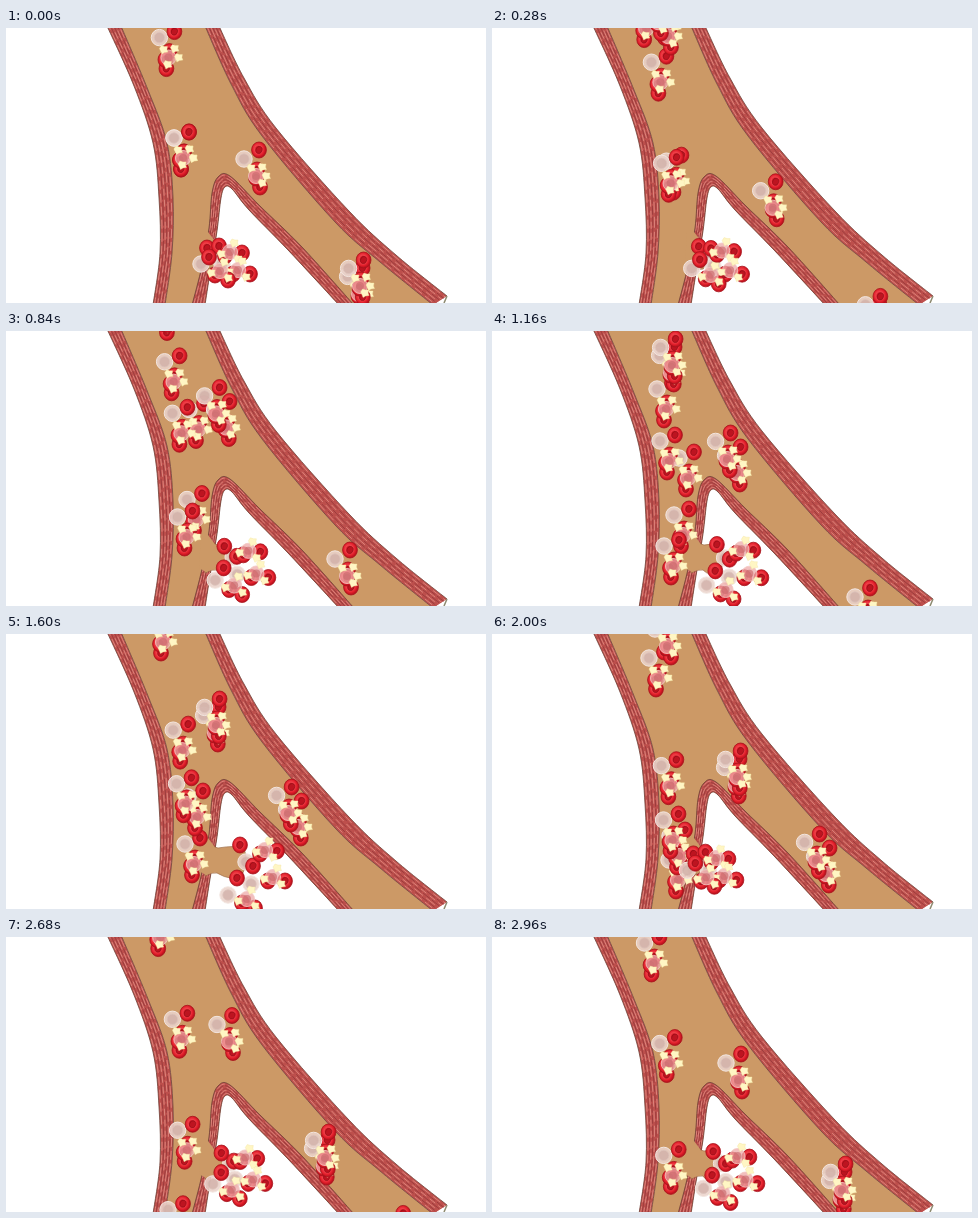
Recreate the animation shown at these times as an HTML page. Size 480 by 275 pixels, loop 3 s.

```html
<!DOCTYPE html>
<html lang="en">
<head>
<meta charset="utf-8">
<title>Blood vessel</title>
<style>
  html, body { margin: 0; width: 100%; height: 100%; overflow: hidden; background: #fff; }
  svg { display: block; width: 100%; height: 100%; }
</style>
</head>
<body>
<svg id="stage" viewBox="0 0 480 275">
  <defs>
    <radialGradient id="redFill" cx=".45" cy=".45">
      <stop offset="0" stop-color="#b80f1c"/>
      <stop offset=".3" stop-color="#c9141f"/>
      <stop offset=".5" stop-color="#f0414a"/>
      <stop offset=".8" stop-color="#e21f2b"/>
      <stop offset="1" stop-color="#c01420"/>
    </radialGradient>
    <g id="red">
      <ellipse rx="7.4" ry="8" fill="url(#redFill)" stroke="#a8121b" stroke-width=".8"/>
      <ellipse rx="3" ry="3.6" fill="#bd1420" stroke="#8f0d16" stroke-width=".6" transform="rotate(20)"/>
    </g>
    <g id="white">
      <circle r="8.2" fill="#ead3cb" fill-opacity=".88" stroke="#f3e6e0" stroke-width="1"/>
      <circle r="5.2" fill="#cfaea6" fill-opacity=".75" stroke="#dcc3bb" stroke-width=".8"/>
    </g>
    <g id="pale">
      <circle r="7.6" fill="#eeaaa8" fill-opacity=".75" stroke="#f3c8c2" stroke-width=".8"/>
      <circle r="4" fill="#c9686c" fill-opacity=".65"/>
    </g>
    <path id="platelet" fill="#fff6c4" stroke="#f3e3a0" stroke-width=".4"
      d="M-4-1L-2-4L1-3L4-3L3.5 0L4.5 2.5L1 3L-1.5 4.5L-2.5 2Z"/>
  </defs>
</svg>
<script>
const LOOP = 3000, STEP = 40;
const stage = document.getElementById('stage');

function add(parent, tag, attrs = {}) {
  const node = document.createElementNS('http://www.w3.org/2000/svg', tag);
  for (const key in attrs) node.setAttribute(key, attrs[key]);
  parent.appendChild(node);
  return node;
}
const put = (parent, id, x, y) =>
  add(parent, 'use', { href: '#' + id, transform: `translate(${x} ${y})` });

// Catmull-Rom curve through the points, as the tail of a path
function curve(pts) {
  let d = '';
  for (let i = 0; i < pts.length - 1; i++) {
    const a = pts[Math.max(i - 1, 0)], b = pts[i], c = pts[i + 1], e = pts[Math.min(i + 2, pts.length - 1)];
    d += `C${b[0] + (c[0] - a[0]) / 6} ${b[1] + (c[1] - a[1]) / 6} ` +
         `${c[0] - (e[0] - b[0]) / 6} ${c[1] - (e[1] - b[1]) / 6} ${c[0]} ${c[1]}`;
  }
  return d;
}
const line = pts => `M${pts[0]}` + curve(pts);
const band = (a, b) => {
  const back = [...b].reverse();
  return line(a) + `L${back[0]}` + curve(back) + 'Z';
};
const mix = (a, b, f) => a.map((p, i) => [p[0] + (b[i][0] - p[0]) * f, p[1] + (b[i][1] - p[1]) * f]);

// Each wall: outer edge, inner edge
const walls = [
  [[[101, -2], [128, 58], [147, 115], [153, 170], [154, 225], [147, 277]],
   [[115, -2], [142, 62], [161, 115], [167, 170], [166, 225], [159, 277]]],
  [[[213, -2], [238, 50], [270, 100], [343, 183], [390, 227], [441, 268]],
   [[199, -2], [225, 56], [256, 108], [329, 194], [374, 234], [427, 277]]],
  [[[199, 277], [204, 245], [211, 203], [215, 170], [219, 159], [226, 161], [243, 182], [282, 222], [333, 277]],
   [[186, 277], [196, 238], [203, 200], [206, 165], [212, 149], [224, 148], [254, 178], [296, 219], [348, 277]]]
];

function drawVessel() {
  const [left, right, fork] = walls;
  add(stage, 'path', { d: band(left[1], right[1]), fill: '#cc9966' });
  add(stage, 'path', { d: line(fork[0]) + 'Z', fill: '#fff' });
  walls.forEach(([outer, inner], w) => {
    add(stage, 'path', { d: band(outer, inner), fill: '#bd4f4c' });
    for (let k = 1; k < 8; k++) {
      add(stage, 'path', {
        d: line(mix(outer, inner, k / 8)), fill: 'none',
        stroke: k % 2 ? '#e08b80' : '#973a3b', 'stroke-width': .9,
        'stroke-dasharray': `${7 + k % 3 * 2} ${2 + k % 2 * 2}`, 'stroke-dashoffset': k * 5 + w * 3
      });
    }
    for (const edge of [outer, inner])
      add(stage, 'path', { d: line(edge), fill: 'none', stroke: '#6d4137', 'stroke-width': .8 });
  });
  add(stage, 'path', { d: 'M441 268L438 275', stroke: '#8d8a70', 'stroke-width': 1.5 });
}

function cluster(parent, lean) {
  const g = add(parent, 'g');
  put(g, 'white', -9 - 3 * lean, -20 + 3 * lean);
  put(g, 'red', 6 - 3 * lean, -26);
  put(g, 'red', -2 + 6 * lean, 11);
  put(g, 'red', 1, -6);
  put(g, 'red', -3 + 3 * lean, 2);
  put(g, 'pale', 0, 0);
  put(g, 'platelet', -5, -8);
  put(g, 'platelet', 10, 0);
  put(g, 'platelet', 6, -9);
  put(g, 'platelet', -1 + 7 * lean, 7);
  return g;
}

// Keys are [seconds, x, y]; outside them the part is hidden
function at(keys, t) {
  for (let i = 1; i < keys.length; i++) {
    const [t0, x0, y0] = keys[i - 1], [t1, x1, y1] = keys[i];
    if (t >= t0 && t < t1) {
      const f = (t - t0) / (t1 - t0);
      return [x0 + (x1 - x0) * f, y0 + (y1 - y0) * f];
    }
  }
  return null;
}
const shift = (keys, dt, end = 9) => keys.map(([t, x, y]) => [t + dt, x, y]).filter(k => k[0] <= end);

const leftPath = [[-1.2, 143, -29], [-.8, 157, 8], [-.4, 166, 44], [0, 174, 78], [.6, 177, 130],
                  [1.12, 180, 177], [1.76, 181, 235], [2.08, 179, 262], [2.44, 174, 294], [2.7, 168, 318]];
const flows = [
  { keys: [[3, 177, 130], [3.52, 189, 173], [4.16, 191, 204], [4.6, 188, 230], [5, 186, 246], [5.12, 184, 252]] },
  { keys: [[.1, 165, -40], [.52, 188, 50], [1.16, 196, 147], [1.6, 191, 183], [2, 187, 222], [2.4, 178, 264], [2.8, 168, 305]] },
  { keys: shift(leftPath, 1.16, 3.3) },
  { keys: shift(leftPath, 2.4, 4.5) },
  { keys: shift(leftPath, 3.56) },
  { lean: .8, twin: [-1, 8],
    keys: [[.7, 150, -40], [1.16, 180, 34], [1.6, 210, 91], [2, 245, 143], [2.4, 288, 189], [2.96, 350, 253], [3, 354, 258], [3.4, 398, 310]] },
  { lean: 1,
    keys: [[1.6, 150, -42], [2, 175, 12], [2.4, 200, 66], [2.96, 246, 143], [3, 250, 148], [3.52, 307, 207], [4.16, 375, 283], [4.4, 400, 310]] },
  { lean: .8, twin: [10, 14],
    keys: [[.1, 152, -38], [.52, 185, 37], [1.16, 235, 128], [1.6, 282, 179], [2, 324, 226], [2.4, 367, 273], [2.8, 405, 315]] }
];

drawVessel();
const plume = add(stage, 'path', { fill: '#cc9966', stroke: '#a06f4a', 'stroke-width': .7 });
const mouth = add(stage, 'path', { d: 'M195 204L202 204L208 212V238L200 241L193 237Z', fill: '#cc9966' });

for (const flow of flows) {
  flow.node = add(stage, 'g');
  if (flow.twin) {
    const under = cluster(flow.node, flow.lean);
    under.setAttribute('transform', `translate(${flow.twin})`);
  }
  cluster(flow.node, flow.lean || 0);
}

// Leaking parts: start and travel over 1.6 s
function trio(parent, dx, dy) {
  put(parent, 'red', -5, 4);
  put(parent, 'red', dx, dy);
  put(parent, 'pale', 0, 0);
  put(parent, 'platelet', 4, -9);
  put(parent, 'platelet', -9, 2);
  put(parent, 'platelet', 8, 7);
}
const leak = add(stage, 'g');
const leaking = [
  { kind: 'white', x: 195, y: 236, dx: 27, dy: 25 },
  { kind: 'white', x: 213, y: 224, dx: 27, dy: 4 },
  { kind: 'white', x: 216, y: 236, dx: 29, dy: 14 },
  { kind: 'red', x: 201, y: 220, dx: 33, dy: -9 },
  { kind: 'red', x: 213, y: 218, dx: 34, dy: 14 },
  { pair: [12, 1], x: 224, y: 224, dx: 35, dy: -8 },
  { pair: [12, 4], x: 232, y: 242, dx: 35, dy: 1 },
  { kind: 'red', x: 203, y: 229, dx: 28, dy: 15 },
  { pair: [8, 9], x: 214, y: 243, dx: 27, dy: 22 }
];
for (const part of leaking) {
  part.node = add(leak, 'g');
  if (part.pair) trio(part.node, ...part.pair);
  else put(part.node, part.kind, 0, 0);
}

function render(ms) {
  const t = Math.floor(ms % LOOP / STEP) * STEP / 1000;
  for (const { keys, node } of flows) {
    const p = at(keys, t) || at(keys, t + LOOP / 1000);
    node.setAttribute('visibility', p ? 'visible' : 'hidden');
    if (p) node.setAttribute('transform', `translate(${p})`);
  }
  const f = (t < 1.98 ? t : t - 1.98) / 1.6;
  for (const { node, x, y, dx, dy } of leaking)
    node.setAttribute('transform', `translate(${x + dx * f} ${y + dy * f})`);
  const tip = 208 + 30 * f;
  plume.setAttribute('d', `M200 204Q206 213 212 214Q${tip - 8} ${214 - 3 * f} ${tip} ${216 - 2 * f}` +
    `Q${tip + 5} 228 ${tip - 2} 241Q${tip - 12} ${241 + 7 * f} 211 239Q206 238 199 242Z`);
}

const start = performance.now();
(function tick() {
  render(performance.now() - start);
  requestAnimationFrame(tick);
})();
</script>
</body>
</html>
```
